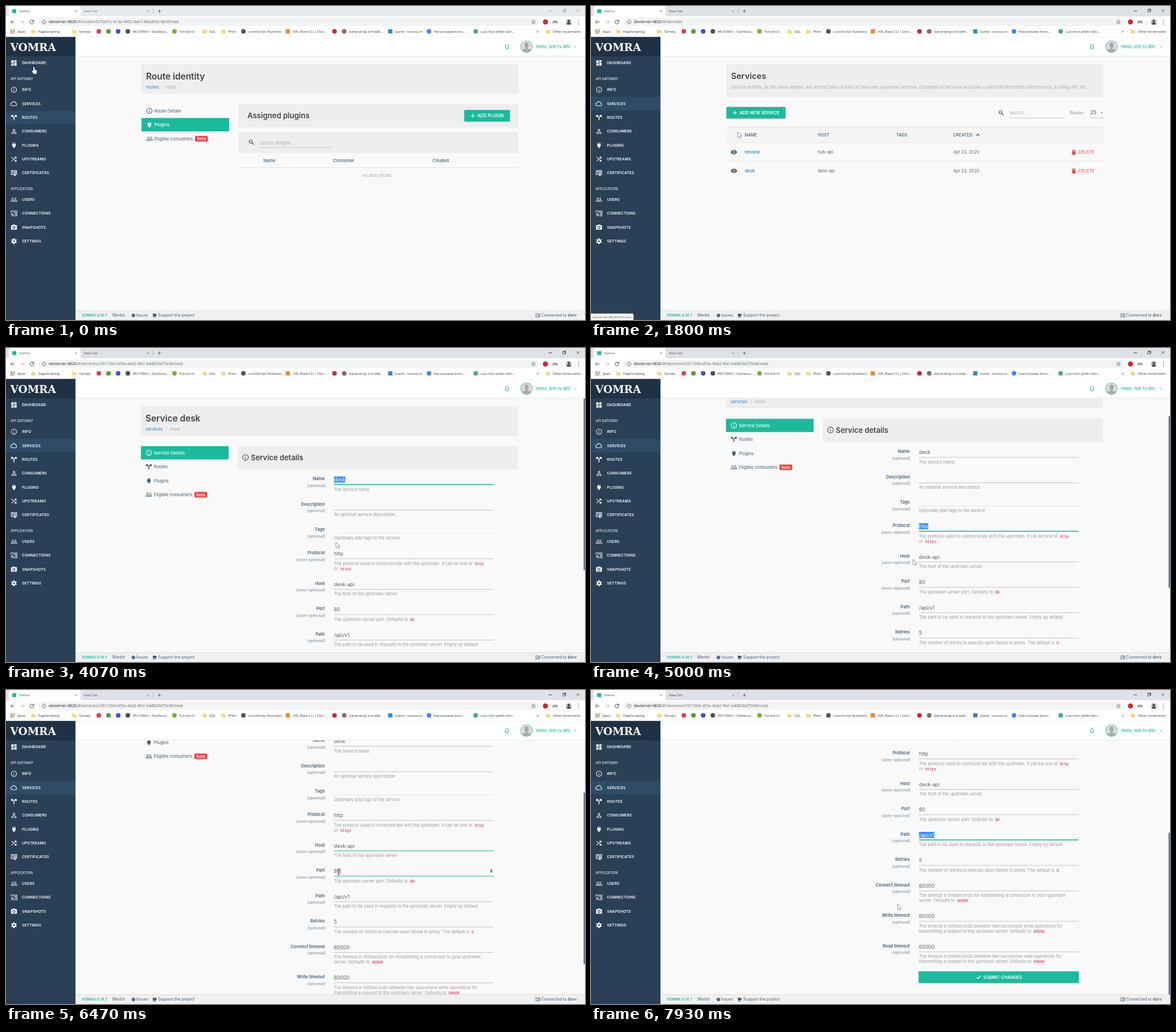
These frames come from a looping animation (1017x551 px, 8 s). An HTML page with a canvas:

```html
<!DOCTYPE html>
<html lang="en">
<head>
<meta charset="utf-8">
<title>Service admin</title>
<style>
html, body { margin: 0; width: 100%; height: 100%; overflow: hidden; background: #f9f9f9; }
canvas { display: block; width: 1017px; height: 551px; }
</style>
</head>
<body>
<canvas id="stage"></canvas>
<script>
const W = 1017, H = 551, LOOP = 8000;
const canvas = document.getElementById('stage');
const dpr = window.devicePixelRatio || 1;
canvas.width = W * dpr;
canvas.height = H * dpr;
const c = canvas.getContext('2d');

const TEAL = '#1abb9c', SLATE = '#425d78', GREY = '#999', LINK = '#1f7fc9', RED = '#f44343', PANEL = '#eee';
const UI = 'Inter, sans-serif', CHROME = '"Open Sans", "Noto Sans", sans-serif', MONO = '"Liberation Mono", monospace';
const HOST = 'devserver:4820', ID = 'c3917264-e05a-4bd2-9fa1-b48820d75e36';
const LIST_URL = '/#!/services', SHOW_URL = `/#!/services/${ID}/read`;
const ROUTE_URL = '/#!/routes/f270a91c-613d-4952-8ae7-40bd93c18e5f/read';

// Icons on a 24 unit grid: stroke width (0 = fill) and path
const ICONS = {
  dash: [0, 'M3 13h8V3H3zM3 21h8v-6H3zM13 21h8V11h-8zM13 3v6h8V3z'],
  info: [2, 'M12 3a9 9 0 1 0 .01 0zM12 11v6M12 7v2'],
  cloud: [2, 'M19 19H6a5 5 0 0 1 0-10 6.5 6.5 0 0 1 12.5 2.5A4 4 0 0 1 19 19z'],
  split: [3, 'M12 21v-9L5 5M4 10.5V5h5.500M13.500 10.500L19 5M14.500 5H20v5.500'],
  person: [2, 'M12 5a3 3 0 1 0 .01 0zM5 19v-2c0-4 14-4 14 0v2z'],
  people: [1.8, 'M7.500 6a2.600 2.600 0 1 0 .01 0zM16.500 6a2.600 2.600 0 1 0 .01 0zM2 18v-2c0-3 11-3 11 0v2zM13 18h9v-2c0-3-6-3-9-1.600'],
  plug: [0, 'M16 7V3h-2v4h-4V3H8v4q-2 0-2 2v5.500L9.500 18v3h5v-3l3.500-3.500V9q0-2-2-2z'],
  shuffle: [2.2, 'M4 5l6 6M4 19L19 5M14 5h5.500v5M14 14l5 5M14 19h5.500v-5'],
  cert: [2.2, 'M11 17H3V4h18v13h-2M15 8a3 3 0 1 0 .01 0zM13 14v7l2-1.500 2 1.500v-7M6 8h4M6 12h4'],
  cast: [2, 'M2 8V4h20v16h-8M2 19a2 2 0 0 1 2 2M2 15a6 6 0 0 1 6 6M2 11a10 10 0 0 1 10 10M9 8h9v8h-3'],
  camera: [0, 'M9 3L7 5H2v15h20V5h-5l-2-2zM12 7.500a5 5 0 1 1-.01 0zM12 9.500a3 3 0 1 1-.01 0z'],
  gear: [4.4, 'M12 7a5 5 0 1 0 .01 0zM12 2v3M12 19v3M3.400 7L6 8.500M18 15.500l2.600 1.500M3.400 17L6 15.500M18 8.500L20.600 7'],
  search: [2.4, 'M9.500 4a5.500 5.500 0 1 0 .01 0zM14 14l6.500 6.500'],
  eye: [0, 'M12 4.500C7 4.500 2.700 7.600 1 12c1.700 4.400 6 7.500 11 7.500s9.300-3.100 11-7.500c-1.700-4.400-6-7.500-11-7.500zM12 7a5 5 0 1 1-.01 0zM12 9a3 3 0 1 1-.01 0z'],
  trash: [0, 'M6 8v11q0 2 2 2h8q2 0 2-2V8zM19 4h-3.500l-1-1h-5l-1 1H5v2.500h14z'],
  check: [2.6, 'M3.500 12.500l5.500 5L21 6'],
  plus: [2.2, 'M12 4v16M4 12h16'],
  cross: [2, 'M5 5l14 14M19 5L5 19'],
  bell: [2, 'M12 4a5 5 0 0 1 5 5v6l2 2H5l2-2V9a5 5 0 0 1 5-5zM10 20.500h4'],
  back: [2.2, 'M21 12H4M12 4l-8 8 8 8'],
  next: [2.2, 'M3 12h17M12 4l8 8-8 8'],
  reload: [2.4, 'M18 7a8 8 0 1 0 2 6M20 3v7h-7'],
  star: [1.8, 'M12 3l2.600 6 6.400.600-4.900 4.200 1.500 6.300L12 16.800l-5.600 3.300 1.500-6.300L3 9.600 9.400 9z'],
  folder: [0, 'M2 4h8l2 3h10v14H2z'],
  cup: [0, 'M3 4h16v3h3v6h-4l-1 4H5zM3 19h16v2H3z'],
  bug: [0, 'M12 3a9 9 0 1 0 .01 0zM11 7h2v6h-2zM11 15h2v2h-2z'],
  up: [2.6, 'M5 16l7-7 7 7'],
  down: [0, 'M4 8h16l-8 9z'],
  spin: [0, 'M4 10h16l-8-9zM4 14h16l-8 9z'],
  arrow: [0, 'M0 0v9.200l2.100-1.900 1.500 3.400 1.500-.700-1.500-3.200h2.900z'],
  hand: [0, 'M-1 .500q1-1.300 2 0v4l3.300.900q1.100.400 1 2L4.700 12h-5l-3.200-4.600q.2-1.400 1.400-.700l1.100.900z'],
  beam: [0.8, 'M-2-5q2 0 2 1.200q0-1.200 2-1.200M0-4v8M-2 5q2 0 2-1.200q0 1.200 2 1.200']
};
for (const k in ICONS) ICONS[k] = { line: ICONS[k][0], path: new Path2D(ICONS[k][1]) };

function icon(name, cx, cy, size, color) {
  const { line, path } = ICONS[name];
  c.save();
  c.translate(cx - size / 2, cy - size / 2);
  c.scale(size / 24, size / 24);
  c.fillStyle = c.strokeStyle = color;
  c.lineWidth = line;
  if (line) c.stroke(path); else c.fill(path, 'evenodd');
  c.restore();
}

function box(x, y, w, h, color, r = 0) {
  c.fillStyle = color;
  c.beginPath();
  c.roundRect(x, y, w, h, r);
  c.fill();
}

function dot(x, y, r, color) {
  c.fillStyle = color;
  c.beginPath();
  c.arc(x, y, r, 0, 7);
  c.fill();
}

// Draws text centred vertically on y and returns its right edge
function text(s, x, y, size, color, { weight = 400, family = UI, align = 'left', style = 'normal' } = {}) {
  c.font = `${style} ${weight} ${size}px ${family}`;
  c.textAlign = align;
  c.fillStyle = color;
  c.fillText(s, x, y + size * 0.36);
  return x + c.measureText(s).width;
}
const chrome = (s, x, y, size, color) => text(s, x, y, size, color, { family: CHROME });

// Help text; parts in backticks are code
function rich(s, x, y) {
  s.split('`').forEach((part, i) => {
    if (!part) return;
    if (i % 2 === 0) { x = text(part, x, y, 7.34, GREY); return; }
    c.font = `6.4px ${MONO}`;
    const w = c.measureText(part).width;
    box(x, y - 4, w + 4, 8.4, '#f9f2f4', 1);
    text(part, x + 2, y + 0.3, 6.4, '#c7254e', { family: MONO });
    x += w + 5;
  });
}

const ease = p => p * p * (3 - 2 * p);
const ramp = (t, start, span) => Math.min(1, Math.max(0, (t - start) / span));

function track(keys, t) {
  const i = keys.findIndex(k => k[0] > t);
  if (i < 0) return keys[keys.length - 1].slice(1);
  if (i === 0) return keys[0].slice(1);
  const a = keys[i - 1], b = keys[i], p = ease((t - a[0]) / (b[0] - a[0]));
  return a.slice(1).map((v, n) => v + (b[n + 1] - v) * p);
}

const POINTER = [
  [0, 49, 107], [60, 49, 107], [330, 45, 174], [1150, 45, 174], [1450, 90, 198], [1800, 258, 221],
  [1900, 258, 221], [2270, 270, 289], [2730, 270, 289], [2800, 270, 293], [3000, 274, 294], [3530, 587, 231],
  [3850, 587, 231], [4070, 580, 341], [4270, 584, 361], [4430, 584, 361], [4750, 566, 371], [5030, 566, 371],
  [5290, 536, 318], [5450, 521, 291], [5740, 590, 274], [5900, 590, 274], [6250, 584, 319], [6610, 584, 319],
  [6850, 585, 362], [7040, 585, 362], [7400, 545, 379], [7870, 540, 377], [7930, 538.5, 376]
];
const SCROLL = [[4780, 0], [5000, 48], [5270, 141], [7100, 141], [7750, 249]];

// Field, focus time, time its text is selected, blur time
const FOCUS = {
  Name: [3660, 3720, 4270], Protocol: [4270, 4320, 5750], Host: [5750, 5810, 6350],
  Port: [6350, 6570, 6870], Path: [6870, 6930, 9000]
};

const BETWEEN = kind => [`The timeout in milliseconds between two successive ${kind} operations for`,
  'transmitting a request to the upstream server. Defaults to `60000`'];
const FIELDS = [
  ['Name', 229.5, 0, 'desk', ['The service name.']],
  ['Description', 274, 0, '', ['An optional service description.']],
  ['Tags', 318.5, 0, '', ['Optionally add tags to the service']],
  ['Protocol', 359.5, 1, 'http', ['The protocol used to communicate with the upstream. It can be one of `http`', 'or `https`.']],
  ['Host', 413, 1, 'desk-api', ['The host of the upstream server.']],
  ['Port', 457.5, 1, '80', ['The upstream server port. Defaults to `80`.']],
  ['Path', 502, 0, '/api/v1', ['The path to be used in requests to the upstream server. Empty by default.']],
  ['Retries', 546.5, 0, '5', ['The number of retries to execute upon failure to proxy. The default is `5`.']],
  ['Connect timeout', 591, 0, '60000', ['The timeout in milliseconds for establishing a connection to your upstream', 'server. Defaults to `60000`']],
  ['Write timeout', 644.5, 0, '60000', BETWEEN('write')],
  ['Read timeout', 698, 0, '60000', BETWEEN('read')]
];

const MENU = [
  ['dash', 'DASHBOARD', 100], ['info', 'INFO', 147], ['cloud', 'SERVICES', 171.3], ['split', 'ROUTES', 195.7],
  ['person', 'CONSUMERS', 220], ['plug', 'PLUGINS', 244.3], ['shuffle', 'UPSTREAMS', 268.7], ['cert', 'CERTIFICATES', 293],
  ['people', 'USERS', 339.7], ['cast', 'CONNECTIONS', 364], ['camera', 'SNAPSHOTS', 388.3], ['gear', 'SETTINGS', 412.7]
];

// Icon colour ('' = folder), icon x, label
const BOOKMARKS = [
  ['', 48, 'PageScripting'], ['', 120, 'Tarnely'], ['#e23b4e', 163], ['#4f9d3a', 180], ['#3b4fe0', 197],
  ['#4a4f55', 214, 'VELTORIA | Dashboa...'], ['#6fb52c', 296, 'Torvick UI'], ['', 349, 'SQL'], ['', 382, 'Phim'],
  ['#555', 417, 'LoomScript Numbers'], ['#f0852d', 495, '.KEL Base CLI | Ostr...'], ['#c8283c', 577],
  ['#8a6a5c', 594, 'Generating a model...'], ['#2f86d6', 675, 'Game - tuvoza.vn'], ['#4285f4', 743, 'Harunosawa kono...'],
  ['#3fae8f', 825, 'Lựa chọn phiên bản...'], ['', 952, 'Other bookmarks']
];

function browser(t, url) {
  const ink = t < 870 ? '#999' : '#222';
  box(0, 0, W, 18, t < 870 ? '#e7eaed' : '#dee1e6');
  box(5, 0, 126, 20, '#fff', [4, 4, 0, 0]);
  box(0, 18, W, 37, '#fff');
  box(11, 5.5, 7, 7, TEAL);
  chrome('Vomra', 23, 9, 6, '#444');
  chrome('New Tab', 137, 9, 6, t < 870 ? '#777' : '#555');
  icon('cross', 123, 9, 6, '#444');
  icon('cross', 249.5, 9, 6, '#555');
  box(258, 4, 0.6, 10, '#999');
  icon('plus', 269.5, 9, 8.5, '#444');
  box(953, 8, 6, 0.8, ink);
  c.strokeStyle = ink;
  c.lineWidth = 0.7;
  c.strokeRect(978, 6.5, 4, 4);
  c.beginPath();
  c.moveTo(979.2, 6.3); c.lineTo(979.2, 5.2); c.lineTo(983.3, 5.2); c.lineTo(983.3, 9.3); c.lineTo(982.2, 9.3);
  c.stroke();
  icon('cross', 1004.5, 8, 8, ink);

  icon('back', 11.5, 28, 10, '#444');
  icon('next', 28.5, 28, 10, '#bbb');
  icon('reload', 45.5, 28, 10, '#444');
  box(57, 20.5, 880, 14.5, '#f1f3f4', 7);
  icon('info', 67, 28, 9, '#555');
  chrome(url, chrome(HOST, 75, 28, 6.8, '#222'), 28, 6.8, '#666');
  icon('star', 926.5, 28, 9.5, '#555');
  dot(947.5, 28, 4.5, '#d9232e');
  text('(m)', 964.5, 28, 5.5, '#444', { weight: 700, align: 'center' });
  box(976, 23, 0.6, 10, '#ddd');
  dot(988.5, 28, 5.5, '#c9ccd0');
  dot(988.5, 26.5, 2.2, '#44474c');
  box(985, 29, 7, 3.4, '#44474c', [3, 3, 1, 1]);
  for (const y of [24.5, 28, 31.5]) dot(1005.5, y, 0.8, '#444');

  const tints = ['#ea4335', '#fbbc05', '#34a853', '#4285f4'];
  for (let i = 0; i < 9; i++) box(8 + i % 3 * 2.8, 41 + Math.floor(i / 3) * 2.8, 1.9, 1.9, tints[(i + (i > 4)) % 4]);
  chrome('Apps', 20, 44.5, 6, '#333');
  for (const [color, x, label] of BOOKMARKS) {
    if (!color) icon('folder', x, 44.5, 9, '#f7d774');
    else if (x === 495 || x === 675) box(x - 3.7, 40.8, 7.4, 7.4, color);
    else dot(x, 44.5, 4, color);
    if (label) chrome(label, x + 8.3, 44.5, 6, '#333');
  }
  chrome('»', 932, 44, 7.5, '#333');
  box(0, 54, W, 0.7, '#ddd');
}

function sidebar(t) {
  box(0, 54.5, 122, H, '#294056');
  box(0, 54.5, 122, 34, '#1f3145');
  text('VOMRA', 7.5, 72, 18.5, '#fff', { weight: 700, family: '"DejaVu Serif", serif' });
  const active = t < 1070 ? 'ROUTES' : 'SERVICES';
  for (const [name, label, y] of MENU) {
    const hover = label === 'SERVICES' && t > 265 && t < 1070;
    if (label === active || hover) box(0, y - 12, 122, 24, '#2f4b66');
    icon(name, 14, y, 12.5, '#f2f5f8');
    text(label, 28, y, 6.75, '#f2f5f8', { weight: 600 });
  }
  text('API GATEWAY', 8, 128, 5.9, '#e6ecf1', { weight: 500 });
  text('APPLICATION', 8, 321, 5.9, '#e6ecf1', { weight: 500 });
}

function header() {
  box(122, 54.5, W, 33.5, '#fff');
  box(122, 87.6, W, 0.8, '#e2e5e7');
  icon('bell', 880, 71.5, 12, TEAL);
  dot(914.3, 71.3, 10.6, TEAL);
  dot(914.3, 71.3, 10, '#dcdcdc');
  c.save();
  c.beginPath();
  c.arc(914.3, 71.3, 9.8, 0, 7);
  c.clip();
  box(910.8, 64, 7, 9.5, '#a9a9a9', 3.5);
  box(912.5, 71, 3.6, 6, '#a9a9a9');
  box(906.5, 75.5, 15.6, 9, '#a9a9a9', 4);
  c.restore();
  text('Hello, linh.tv.dltc', 931, 71.3, 7.6, TEAL, { weight: 500 });
  icon('down', 1000.5, 71.5, 5, TEAL);
}

function footer() {
  box(122, 534, W, 17, '#f0f0f0');
  box(122, 534, W, 0.7, '#d8dadc');
  text('VOMRA 0.14.7', 133, 542.5, 6.6, TEAL, { weight: 600 });
  text('Merbit', 187, 542.5, 7.1, SLATE);
  icon('bug', 223.8, 543, 8.5, SLATE);
  text('Issues', 228.5, 542.5, 7, SLATE);
  icon('cup', 261, 543, 9, SLATE);
  text('Support the project', 267.3, 542.5, 7, SLATE);
  icon('cast', 933.7, 543, 9, SLATE);
  const end = text('Connected to ', 940, 542.5, 7, SLATE);
  text('dorv', end, 542.5, 7, SLATE, { weight: 600 });
}

function button(name, label, x, y, w, h, iconX, textX) {
  c.shadowColor = 'rgba(0, 0, 0, 0.35)';
  c.shadowBlur = 2 * dpr;
  c.shadowOffsetY = 0.5 * dpr;
  box(x, y, w, h, TEAL, 0.8);
  c.shadowColor = 'transparent';
  icon(name, iconX, y + h / 2, 11, '#fff');
  text(label, textX, y + h / 2, 7.5, '#fff', { weight: 600 });
}

function heading(x, title, link, here) {
  box(x, 102, 662, 52, PANEL);
  text(title, x + 8, 123, 15.4, '#444', { weight: 600 });
  const end = text(link, x + 8, 142, 7.5, LINK);
  text('/', end + 5, 142, 7.2, '#bbb');
  text(here, end + 12, 142, 7.5, '#aaa');
}

function tabs(x, items, active) {
  items.forEach(([name, label], i) => {
    const y = 184 + i * 24.4, on = i === active, ink = on ? '#fff' : SLATE;
    if (on) box(x, y - 11.8, 154, 23.4, TEAL, 1);
    icon(name, x + 14, y, 12.5, ink);
    text(label, x + 22.7, y, 7.6, ink, { weight: on ? 500 : 400 });
  });
  const y = 184 + (items.length - 1) * 24.4;
  box(x + 94, y - 4.8, 22.5, 9.8, RED, 1.5);
  text('beta', x + 105.2, y, 7, '#fff', { weight: 600, align: 'center' });
}

function routePage() {
  heading(238, 'Route identity', 'routes', 'route');
  tabs(238, [['info', 'Route Details'], ['plug', 'Plugins'], ['people', 'Eligible consumers']], 1);
  box(408, 172, 492, 41, PANEL);
  text('Assigned plugins', 424, 192, 13.1, '#444', { weight: 600 });
  button('plus', 'ADD PLUGIN', 805, 182.5, 80, 20, 820, 828);
  box(408, 221, 492, 37, PANEL);
  icon('search', 431, 239, 12, '#555');
  text('search plugins...', 446, 240, 7.7, '#aaa');
  box(446, 247.8, 128, 0.7, '#bbb');
  [['Name', 452], ['Consumer', 574.5], ['Created', 749]].forEach(([s, x]) => text(s, x, 271, 7.6, SLATE, { weight: 500 }));
  box(408, 283, 492, 0.8, '#ddd');
  text('no data found...', 654.5, 297, 7.6, '#aaa', { style: 'italic', align: 'center' });
}

function listPage() {
  box(238, 102, 662, 57.5, PANEL);
  text('Services', 246, 123, 14.6, '#444', { weight: 600 });
  text('Service entities, as the name implies, are abstractions of each of your own upstream services. ' +
    'Examples of Services would be a data transformation microservice, a billing API, etc.', 246, 142, 7.4, '#aaa');
  button('plus', 'ADD NEW SERVICE', 238, 177.3, 103.5, 20, 253, 261);
  icon('search', 720.5, 187.5, 12, '#555');
  text('search...', 735, 187.5, 7.7, '#aaa');
  box(735, 196.3, 95, 0.7, '#bbb');
  text('Results :', 841, 187.3, 7, '#888');
  text('25', 877, 187.3, 8.8, '#555');
  icon('down', 897, 187.3, 5, '#555');
  box(877, 196.3, 24, 0.7, '#bbb');
  box(238, 212, 662, 28, '#f5f5f5');
  for (const y of [212, 239.5, 272.3]) box(238, y, 662, 0.8, '#ddd');
  [['NAME', 270], ['HOST', 398], ['TAGS', 536], ['CREATED', 636]].forEach(([s, x]) => text(s, x, 226, 7.4, SLATE, { weight: 500 }));
  icon('up', 679.5, 226, 10, '#333');
  [['noveral', 'hub-api', 256.5], ['desk', 'desk-api', 289.3]].forEach(([name, host, y]) => {
    icon('eye', 251, y, 12, '#3a4a5a');
    text(name, 270, y, 7.6, LINK, { weight: 500 });
    text(host, 398, y, 7.5, '#666');
    text('Apr 23, 2020', 636, y, 7.4, '#666');
    icon('trash', 848, y + 0.3, 11.5, RED);
    text('DELETE', 856.5, y, 7.5, RED);
  });
}

function field([label, y, semi, value, help], t) {
  const tags = label === 'Tags', lineY = y + (tags ? 6.5 : 10.2);
  text(label, 560, y, 7.5, SLATE, { weight: 600, align: 'right' });
  text(semi ? '(semi-optional)' : '(optional)', 561, y + 11.5, 7.1, '#73879c', { style: 'italic', align: 'right' });
  box(576, lineY - 0.3, 280.5, 0.8, tags ? '#ddd' : '#b0b0b0');
  const [focus, select, blur] = FOCUS[label] || [9e9, 9e9, 9e9];
  const selected = t >= select && t < blur;
  c.font = `8.8px ${UI}`;
  const w = c.measureText(value).width;
  if (selected) box(576, y - 4, w, 10.6, '#318efc');
  text(value, 576, y + 1.5, 8.8, selected ? '#fff' : '#5c5f62');
  c.globalAlpha = ramp(t, focus, 250) * (1 - ramp(t, blur, 250));
  box(576, lineY - 0.9, 280.5, 1.4, TEAL);
  c.globalAlpha = 1;
  if (t >= focus && t < select) box(576.5 + w, y - 3.5, 0.6, 9.5, '#444');
  if (label === 'Port' && t >= focus - 100 && t < blur) icon('spin', 852.5, y + 1, 6.5, '#333');
  help.forEach((s, i) => rich(s, 576, y + (tags ? 14.7 : 18.5) + i * 9.1));
}

function showPage(t) {
  const [scroll] = track(SCROLL, t);
  c.save();
  c.translate(0, -scroll);
  heading(237, 'Service desk', 'services', 'show');
  tabs(237, [['info', 'Service Details'], ['split', 'Routes'], ['plug', 'Plugins'], ['people', 'Eligible consumers']], 0);
  box(407, 172, 492, 41, PANEL);
  icon('info', 420.7, 192, 13.5, '#444');
  text('Service details', 430, 192, 12.9, '#444', { weight: 600 });
  FIELDS.forEach(f => field(f, t));
  button('check', 'SUBMIT CHANGES', 575.7, 742.7, 281.2, 20.2, 681, 689);
  c.restore();
  box(1014.5, 88.5 + scroll * 0.65, 2.5, 301, '#557a9b');
}

function status(t) {
  const path = t < 1400 ? LIST_URL : t < 2120 ? '/#!/routes' : SHOW_URL;
  const alpha = ramp(t, 440, 160) * (1 - ramp(t, 3250, 200));
  if (!alpha) return;
  c.globalAlpha = alpha;
  c.font = `5.8px ${CHROME}`;
  const w = c.measureText(HOST + path).width + 6;
  box(0, 539.6, w + 0.6, 12, '#c8cacc', [0, 2, 0, 0]);
  box(0, 540.2, w, 11, '#f8f9fa', [0, 2, 0, 0]);
  chrome(HOST + path, 3, 546, 5.8, '#5f6368');
  c.globalAlpha = 1;
}

function pointer(t) {
  const [x, y] = track(POINTER, t);
  const within = spans => spans.some(([a, b]) => t >= a && t < b);
  const shape = within([[0, 1500], [2200, 2760]]) ? 'hand'
    : within([[3510, 3890], [4230, 4460], [5690, 5960], [6200, 6680], [6800, 7090]]) ? 'beam' : 'arrow';
  const { path } = ICONS[shape];
  c.save();
  c.translate(x, y);
  c.lineJoin = 'round';
  c.strokeStyle = '#222';
  c.lineWidth = 0.9;
  c.stroke(path);
  if (shape !== 'beam') {
    c.fillStyle = '#fff';
    c.fill(path);
  }
  c.restore();
}

function draw(t) {
  c.setTransform(dpr, 0, 0, dpr, 0, 0);
  box(0, 0, W, H, '#f9f9f9');
  c.save();
  c.beginPath();
  c.rect(122, 88, W - 122, 446);
  c.clip();
  if (t < 1070) routePage();
  else if (t < 2730) listPage();
  else showPage(t);
  c.restore();
  browser(t, t < 1070 ? ROUTE_URL : t < 2730 ? LIST_URL : SHOW_URL);
  header();
  footer();
  sidebar(t);
  status(t);
  pointer(t);
}

const start = performance.now();
function frame() {
  draw((performance.now() - start) % LOOP);
  requestAnimationFrame(frame);
}
frame();
</script>
</body>
</html>
```
